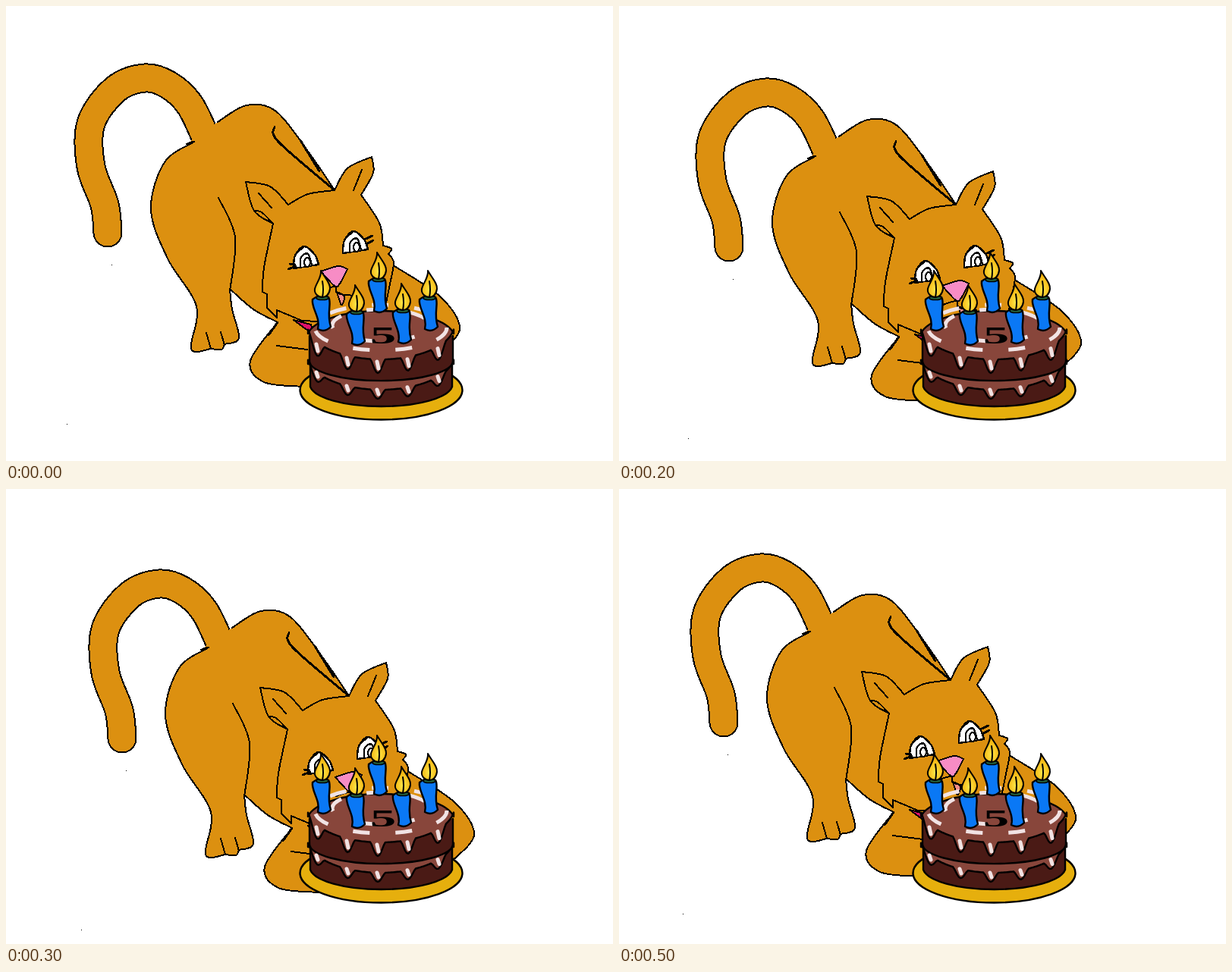
Write an HTML page that moves like this. It is 800 px wide and 600 px high and loops after 600 ms.

```html
<!DOCTYPE html>
<html lang="en">
<head>
<meta charset="utf-8">
<title>Cat and birthday cake</title>
<style>
html, body { margin: 0; width: 100%; height: 100%; overflow: hidden; background: #fff; }
svg { display: block; width: 800px; height: 600px; }
path, ellipse { stroke: #000; stroke-width: 2.4; stroke-linejoin: round; stroke-linecap: round; fill: none; }
#cat { shape-rendering: crispEdges; }
#cat path { stroke-width: 2; }
#cat .tail { stroke-width: 39; }
#cat .tail.inside { stroke: #dc9010; stroke-width: 35; }
#cat .thick { stroke-width: 3; }
.fur { fill: #dc9010; }
.white { fill: #fff; }
.sponge { fill: #4a1a15; }
.icing { fill: #88463b; }
#cake .shine { stroke: #f1e3e4; stroke-width: 5; }
#cake .ring { stroke-linecap: butt; stroke-dasharray: 22 34; }
text { font: bold 32px "Liberation Serif", Times, serif; text-anchor: middle; }
</style>
</head>
<body>
<!-- data-c: smooth curve through points; "|" makes a corner, ";" a new stroke -->
<svg viewBox="0 0 800 600">
  <defs>
    <radialGradient id="glow" cx=".5" cy=".72" r=".6">
      <stop offset="0" stop-color="#ffe84a"/><stop offset="1" stop-color="#f2ac06"/>
    </radialGradient>
    <g id="candle">
      <path fill="#0a78f5" style="fill:#0a78f5" d="M404 387C411 381 420 381 425 384C430 392 422 404 428 423Q420 431 411 426C415 411 402 398 404 387Z"/>
      <ellipse cx="417" cy="385" rx="8" ry="2.6" style="fill:#24603c;stroke-width:1.5"/>
      <path style="fill:url(#glow);stroke-width:2" d="M415 349C420 358 428 366 427 373C426 381 421 384 417 384C411 384 406 379 407 373C409 365 416 358 415 349Z"/>
      <path style="stroke-width:2" d="M417 384Q419 374 417 363"/>
    </g>
    <g id="eye">
      <path class="white" data-c="379,346 381,329 393,317 407,328 412,341|379,346"/>
      <path class="thick" data-c="379,346 381,329 393,317"/>
      <path class="white" data-c="388,344 389,331 398,327 403,342"/>
      <ellipse class="white" cx="397" cy="338" rx="4" ry="6"/>
    </g>
  </defs>

  <g id="cat">
    <path class="tail" data-c="264,175 242,130 214,104 183,95 144,110 112,155 112,212 130,262 134,299"/>
    <path class="fur" data-c="238,182|248,179 209,206 191,268 213,333 251,396 244,452 270,452|284,453 288,446|307,438 298,400 295,373|326,400 358,417|322,468 340,496 393,502|573,457|598,425 572,383 512,343|433,243|399,193 356,139 317,131 279,153"/>
    <path class="tail inside" data-c="264,175 242,130 214,104 183,95 144,110 112,155 112,212 130,262 134,299"/>
    <path data-c="238,182|248,179;280,253 302,305 295,376;264,431 270,452;283,430 288,447;357,448 397,453"/>
    <path class="thick" data-c="354,159 359,179 433,243;388,177 413,218;358,417 346,434"/>
    <path style="fill:#e0106a" data-c="379,414 402,420|402,430 379,414"/>

    <path class="fur" data-c="433,243 450,214 482,199|484,220 468,249|492,286 497,316|508,320 504,327|511,338 507,362|495,420|390,415|357,401|357,411|344,398|344,380|338,377|340,345 352,287|327,270 316,232|348,238 372,262|398,248 433,243"/>
    <path data-c="469,216 458,243;333,247 350,266;327,270 337,272 352,287"/>

    <use href="#eye"/>
    <use href="#eye" x="65" y="-20"/>
    <path class="thick" data-c="372,347 382,343;374,340 381,341;472,308 483,303;475,314 484,309"/>
    <path style="fill:#f78cc5" data-c="415,350 438,343 450,347|440,366 433,369 415,350"/>
    <path style="fill:#f58d88" data-c="436,377 446,383 442,394 436,377"/>
    <path data-c="416,375 434,370 437,379 460,382"/>
    <path style="stroke:none;fill:#000" d="M139 341h1v1h-1zM80 551h1v1h-1z"/>
  </g>

  <g id="cake">
    <ellipse cx="494.500" cy="506.500" rx="107" ry="39" style="fill:#e6af0d"/>
    <path class="sponge" d="M401 440V502A94 29 0 0 0 588 502V440"/>
    <path class="icing" id="lower"/>
    <path class="sponge" d="M400 435V468A94 26 0 0 0 589 468V435"/>
    <path class="icing" id="upper"/>
    <path class="shine" id="drops"/>
    <ellipse class="shine ring" cx="494" cy="424" rx="87" ry="30"/>
    <ellipse class="shine ring" cx="494" cy="421" rx="64" ry="21" stroke-dashoffset="30"/>
    <text transform="translate(497 445) scale(2.150 1)">5</text>
    <use href="#candle" x="74" y="-24"/>
    <use href="#candle"/>
    <use href="#candle" x="141"/>
    <use href="#candle" x="45" y="19"/>
    <use href="#candle" x="106" y="17"/>
  </g>
</svg>
<script>
const byId = id => document.getElementById(id);

// Catmull-Rom spline through each run of points
function curve(text) {
  let end;
  const run = part => {
    const pts = part.trim().split(/\s+/).map(p => p.split(',').map(Number));
    let d = end ? '' : 'M' + pts[0];
    if (end) pts.unshift(end);
    for (let i = 0; i < pts.length - 1; i++) {
      const b = pts[i], c = pts[i + 1], a = pts[i - 1] || b, e = pts[i + 2] || c;
      const h1 = b.map((v, k) => v + (c[k] - a[k]) / 6);
      const h2 = c.map((v, k) => v - (e[k] - b[k]) / 6);
      d += `C${h1} ${h2} ${c}`;
    }
    end = pts[pts.length - 1];
    return d;
  };
  return text.split('|').map(run).join('');
}
for (const path of document.querySelectorAll('[data-c]'))
  path.setAttribute('d', path.dataset.c.split(';').map(curve).join(''));

// Icing runs down the front of the cake in evenly spaced drips
const left = 398, right = 590, mid = 494, gap = 40;
function edge(x, y, depth) {
  const u = (x - mid) / 97;
  const drip = Math.max(0, Math.cos(2 * Math.PI * (x - 490) / gap)) ** 1.4;
  return y + 46 * Math.sqrt(1 - u * u) + depth * drip;
}
function icing(id, y, depth, top) {
  let d = `M${left} ${y + 12}`;
  for (let x = left; x <= right; x += 2) d += `L${x} ${edge(x, y, depth)}`;
  byId(id).setAttribute('d', `${d}L${right} ${y + 12}${top}Z`);
}
icing('upper', 420, 18, 'A97 35 0 0 0 398 432');
icing('lower', 460, 12, '');

let drops = '';
for (let x = 410; x < right; x += gap)
  for (const [y, depth] of [[420, 18], [460, 12]])
    drops += `M${x + 1} ${edge(x, y, depth) - 6}l-2 ${-depth / 2}`;
byId('drops').setAttribute('d', drops);

// The cat ducks down behind the cake and comes back up in hard steps
const poses = [[0, 0], [4, 9], [11, 19], [19, 30]];
function draw() {
  const step = Math.floor(performance.now() / 100) % 6;
  byId('cat').setAttribute('transform', `translate(${poses[Math.min(step, 6 - step)]})`);
  requestAnimationFrame(draw);
}
draw();
</script>
</body>
</html>
```
